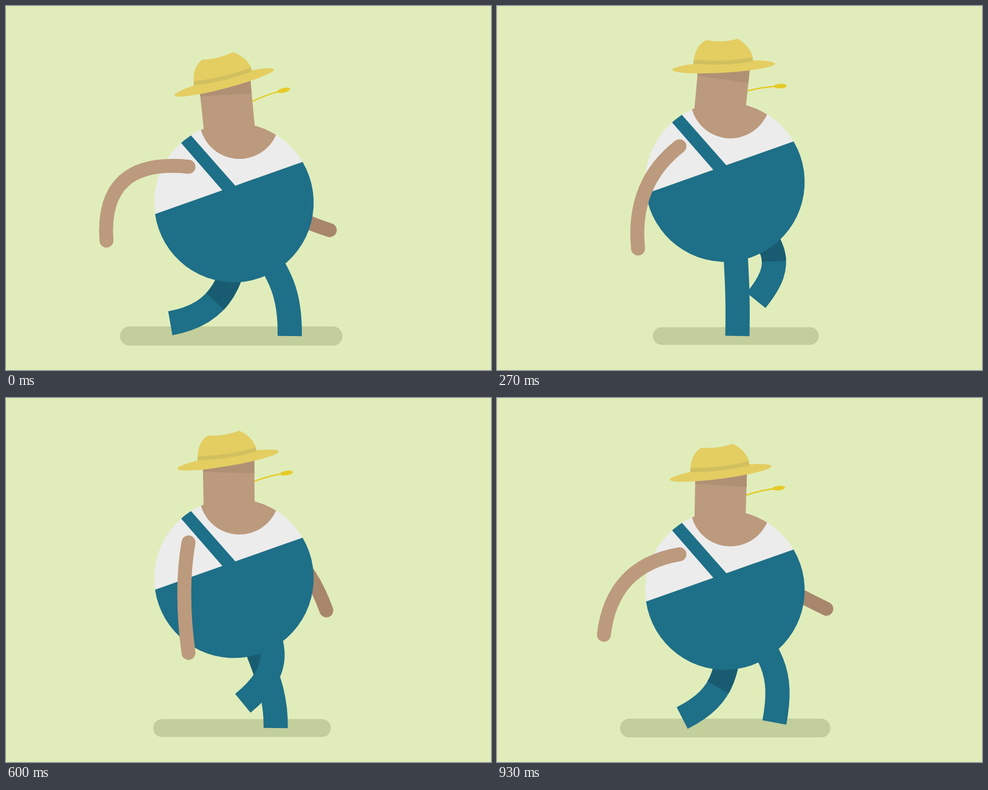
Write an HTML page with a canvas that moves like this. It is 800x600 px and loops after 960 ms.

```html
<!DOCTYPE html>
<html lang="en">
<head>
<meta charset="utf-8">
<title>Walking farmer</title>
<style>
  html, body { margin: 0; width: 100%; height: 100%; overflow: hidden; background: #e0edbb; }
  canvas { display: block; }
</style>
</head>
<body>
<canvas id="stage" width="800" height="600"></canvas>
<script>
const ctx = document.getElementById('stage').getContext('2d');
const LOOP = 960, BEAT = LOOP / 4, STEP = 30, DEG = Math.PI / 180;
const color = {
  sky: '#e0edbb', ground: '#c2ce9c', denim: '#1e6f88', denimDark: '#195c71',
  skin: '#bc9a7d', skinDark: '#a8866c', skinShade: '#b09075', shirt: '#ececec',
  straw: '#e4ce62', band: '#d2c05f', stalk: '#e5cb27'
};

const ease = u => 1 - (1 - u) ** 3 * (1 + 1.35 * u);
const sine = u => Math.sin(u * Math.PI / 2);

// Four keys per loop, one per beat: motion slows into odd keys and snaps through even ones.
function pose(t, keys, curve = ease) {
  const beat = t / BEAT, i = Math.floor(beat) % 4, u = beat % 1;
  const w = i % 2 ? 1 - curve(1 - u) : curve(u);
  return keys[i] + (keys[(i + 1) % 4] - keys[i]) * w;
}

// Following parts rest in their first key until the delay is over.
const late = (t, delay) => Math.max(0, t - delay);

const frontLeg = {
  thigh: [32, 3, -35, 58], x: [468, 397, 280, 420], y: [544, 544, 508, 502], ankle: [-1, -1, -75, -44]
};
const backLeg = {
  thigh: [-4, 40, 47, 0], x: [271, 427, 501, 430], y: [523, 485, 544, 544], ankle: [-80, -39, -1, -1]
};

function fill(style, d) {
  ctx.fillStyle = style;
  ctx.fill(new Path2D(d));
}

function ellipse(style, x, y, rx, ry, turn = 0) {
  ctx.fillStyle = style;
  ctx.beginPath();
  ctx.ellipse(x, y, rx, ry, turn * DEG, 0, 7);
  ctx.fill();
}

function stroke(style, width, cap, d) {
  ctx.strokeStyle = style;
  ctx.lineWidth = width;
  ctx.lineCap = cap;
  ctx.stroke(new Path2D(d));
}

// Angles of limbs are measured from straight down, positive to the right.
const polar = ([x, y], length, angle) =>
  [x + length * Math.sin(angle * DEG), y + length * Math.cos(angle * DEG)];
const mix = (a, b, u) => a.map((v, i) => v + (b[i] - v) * u);

function drawLeg(keys, t, rise, shaded) {
  const hip = [388, 345 - rise], foot = [pose(t, keys.x), pose(t, keys.y)];
  const c1 = polar(hip, 110, pose(t, keys.thigh));
  const c2 = polar(foot, -85, pose(t, keys.ankle));
  stroke(color.denim, 40, 'butt', `M${hip}C${c1} ${c2} ${foot}`);
  if (!shaded) return;
  const u = 0.61, a = mix(hip, c1, u), m = mix(c1, c2, u), b = mix(a, m, u);
  const end = mix(b, mix(m, mix(c2, foot, u), u), u);
  stroke(color.denimDark, 40, 'butt', `M${hip}C${a} ${b} ${end}`);
}

function drawArm(style, shoulder, angle, bulge) {
  const hand = polar(shoulder, 182, angle);
  const middle = polar(shoulder, 91 + (bulge - 72) * 0.2, angle);
  const bend = polar(middle, bulge, angle - 90);
  stroke(style, 23, 'round', `M${shoulder}Q${bend} ${hand}`);
}

function drawBody() {
  const x = 376, y = 324, r = 131.5, left = 171.7 * DEG, right = 329.4 * DEG;
  const segment = (style, from, to) => {
    ctx.fillStyle = style;
    ctx.beginPath();
    ctx.arc(x, y, r, from, to);
    ctx.fill();
  };
  segment(color.shirt, left, right);
  segment(color.denim, right, left);

  ctx.save();
  ctx.beginPath();
  ctx.arc(x, y, r, 0, 7);
  ctx.clip();
  ellipse(color.skin, 385, 186, 66, 66);
  fill(color.denim, 'M276 211L296 203L378 296L378 310H362L357 304Z');
  ctx.restore();
}

function drawHead(angle) {
  ctx.save();
  ctx.translate(326, 200);
  ctx.rotate(angle * DEG);
  ctx.translate(-326, -200);
  stroke(color.stalk, 2.3, 'butt', 'M404 158Q430 146 452 140.5');
  ellipse(color.stalk, 458, 139, 10.8, 3.8, -14);
  fill(color.skin, 'M318 125L402.5 115L411 206H326.5Z');
  fill(color.skinShade, 'M319 135L402.5 115L405.2 144L320.5 149Z');
  ellipse(color.straw, 360, 126, 84.8, 9.7, -14.7);
  fill(color.straw, 'M310 131L309.5 123C309 106 314 96 323.5 88.5C342 88 358 84 374 76C389 81 399 90 404 101L405.5 108Q362 125 310 131Z');
  fill(color.band, 'M309.5 124Q362 118 403.5 101L405.5 108Q362 125 310 131Z');
  ctx.restore();
}

function draw(t) {
  const rise = pose(t, [0, 34, 0, 34]);
  const lifted = drawing => {
    ctx.save();
    ctx.translate(0, -rise);
    drawing();
    ctx.restore();
  };
  ctx.fillStyle = color.sky;
  ctx.fillRect(0, 0, 800, 600);

  const height = 31.5 - 0.075 * rise, r = height / 2;
  stroke(color.ground, height, 'round', `M${188 + 2.04 * rise + r} 544H${555 - 0.71 * rise - r}`);

  const elbow = late(t, 120);
  lifted(() => drawArm(color.skinDark, [385, 265],
    pose(elbow, [55, -5, 52, 61]), pose(elbow, [32, 0, -75, 4])));

  drawLeg(backLeg, t, rise, true);
  drawLeg(frontLeg, t, rise, false);

  lifted(() => {
    drawBody();
    drawHead(pose(late(t, 60), [0, 11.3, 0, 11.3]));
    drawArm(color.skin, [301, 265],
      pose(t, [-48, -23.6, 57, -23.6], sine), pose(elbow, [108, 44, 14, 64]));
  });
}

const start = performance.now();
function tick() {
  const t = (performance.now() - start) % LOOP;
  draw(Math.floor(t / STEP) * STEP);
  requestAnimationFrame(tick);
}
tick();
</script>
</body>
</html>
```
